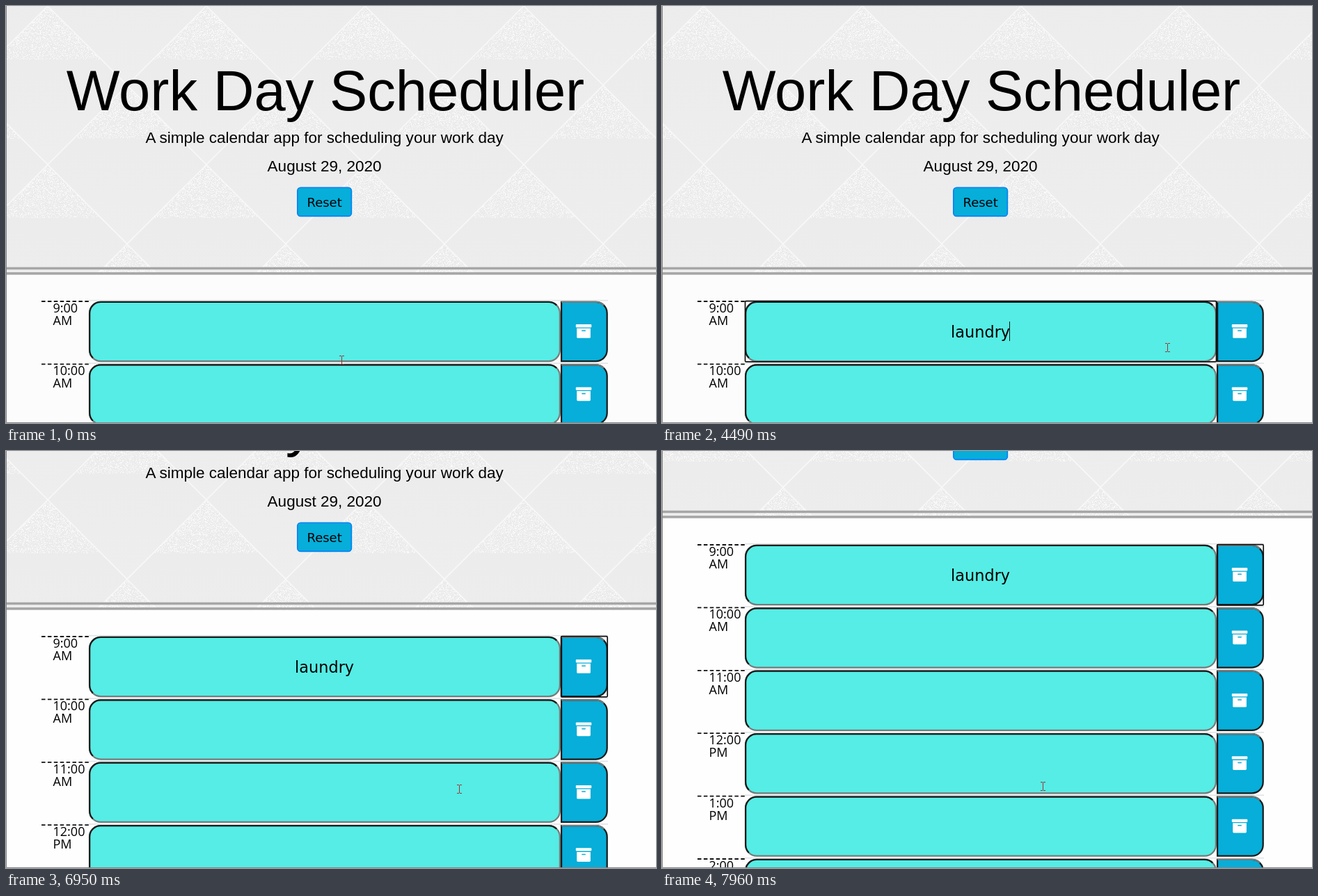
Animation of 934 by 600 pixels, one loop 8000 ms. Source, as an HTML page with a canvas:

```html
<!DOCTYPE html>
<html lang="en">
<head>
<meta charset="utf-8">
<title>Work Day Scheduler</title>
<style>
  html, body { margin: 0; width: 100%; height: 100%; overflow: hidden; background: #fcfcfc; }
  #stage { position: relative; width: 934px; height: 600px; overflow: hidden; background: #fcfcfc; }
  #page { position: absolute; left: 0; top: 0; width: 934px; height: 1000px; }
  #pattern, svg { position: absolute; left: 0; top: 0; overflow: visible; }
  .sans { font-family: "Liberation Sans", Arial, sans-serif; }
  .wide { font-family: "DejaVu Sans", Verdana, sans-serif; }
  .hour { font: 18px "Open Sans", sans-serif; }
  .band { fill: #a6a6a6; }
  .rule { fill: #dfe2e5; }
  .dash { stroke: #111; stroke-width: 1.8; stroke-dasharray: 5.5 3.4; }
  .slot, .save { fill: none; stroke-width: 2.25; }
  .slot .base { fill: #55ede5; }
  .save .base { fill: #06aed9; }
  .slot .base, .save .side { stroke: #737b7b; }
  .slot .side, .save .base { stroke: #171c1c; }
  .save.down .base { stroke: #737b7b; }
  .save.down .side { stroke: #171c1c; }
  .focus { fill: none; stroke: #111; stroke-width: 1.7; }
</style>
</head>
<body>
<div id="stage">
  <div id="page">
    <canvas id="pattern" width="934" height="387"></canvas>
    <svg id="ink" width="934" height="1000">
      <rect class="band" y="375.7" width="934" height="3.5"/>
      <rect class="band" y="383.1" width="934" height="3.5"/>
      <rect x="418.8" y="261.2" width="77.6" height="41.2" rx="4.5" fill="#06aed9" stroke="#067ffa" stroke-width="1.6"/>
      <g id="rows"></g>
      <g text-anchor="middle">
        <g class="sans">
          <text x="459" y="149.5" font-size="81.35">Work Day Scheduler</text>
          <text x="457.6" y="197" font-size="22.53">A simple calendar app for scheduling your work day</text>
          <text x="457.6" y="238" font-size="22.53">August 29, 2020</text>
        </g>
        <g class="wide">
          <text x="457.6" y="289" font-size="18">Reset</text>
          <text id="entry" x="457.6" y="477" font-size="22.4"></text>
        </g>
      </g>
      <rect id="caret" y="454" width="1" height="28" fill="#111"/>
      <rect id="slotFocus" class="focus" x="119.5" y="424.7" width="677" height="87.2" rx="1.5"/>
      <rect id="saveFocus" class="focus" x="797.6" y="424.7" width="66.6" height="87.2" rx="1.5"/>
    </svg>
  </div>
  <svg width="934" height="600">
    <path id="beam" d="M-3 -5.5H0M1 -5.5H4M-3 6.5H0M1 6.5H4M.5 -5V6" fill="none" stroke="#a5302f"/>
    <path id="hand" d="M4.5 1.5q1.5 -1.5 2.5 0v5l5.5 1.2q1.8 .6 1.6 2.3l-1.1 4v2.5H6.2v-1.8L1 9.6q.2 -2 2 -1.2l1.5 1.2z" fill="#fff" stroke="#111"/>
    <path d="M.5 0V599.5H934" fill="none" stroke="#858585"/>
  </svg>
</div>
<script>
const $ = id => document.getElementById(id);
const page = $('page'), entry = $('entry'), stage = $('stage');
const LOOP = 8000, PITCH = 90.4, TOP = 424.8;

function seeded(seed) {
  return () => (seed = (seed * 16807) % 2147483647) / 2147483647;
}

// Diamond lattice; the upper part of every diamond is speckled.
function drawPattern() {
  const c = $('pattern').getContext('2d'), rnd = seeded(77);
  const half = 114, apexes = [];
  for (let k = -2; k < 4; k++)
    for (let x = (k & 1 ? 174 : 60) - 456; x < 1200; x += 228) apexes.push([x, k * 114.2]);
  for (const [x, y] of apexes) {
    const g = c.createLinearGradient(0, y, 0, y + 228);
    g.addColorStop(0, '#ebebeb');
    g.addColorStop(0.4, '#ececec');
    g.addColorStop(1, '#eeeeee');
    c.fillStyle = g;
    c.beginPath();
    c.moveTo(x, y);
    c.lineTo(x + half, y + half);
    c.lineTo(x, y + 228);
    c.lineTo(x - half, y + half);
    c.fill();
  }
  c.fillStyle = 'rgba(255,255,255,.68)';
  for (const [x, y] of apexes) {
    for (let d = 2; d < 77; d++) {
      const density = d > 50 ? 0.24 : 0.31;
      for (let i = -d; i < d; i++)
        if (rnd() < density) c.fillRect(Math.round(x + i), Math.round(y + d), 1, 1);
    }
  }
  c.strokeStyle = '#f8f8f8';
  c.lineWidth = 1.6;
  c.beginPath();
  for (const [x, y] of apexes) {
    c.moveTo(x - half, y + half);
    c.lineTo(x, y);
    c.lineTo(x + half, y + half);
  }
  c.stroke();
}

// Bevelled boxes: a full outline plus the sides lit the other way.
const R = 16, K = R * 0.293;
const arc = (x, y) => `A${R} ${R} 0 0 1 ${x} ${y}`;

function slot(x, y, x2, y2) {
  return `<g class="slot">
    <rect class="base" x="${x}" y="${y}" width="${x2 - x}" height="${y2 - y}" rx="${R}"/>
    <path class="side" d="M${x + K} ${y2 - K}${arc(x, y2 - R)}V${y + R}${arc(x + R, y)}H${x2 - R}${arc(x2 - K, y + K)}"/>
  </g>`;
}

function save(x, y, x2, y2) {
  return `<g class="save">
    <path class="base" d="M${x} ${y}H${x2 - R}${arc(x2, y + R)}V${y2 - R}${arc(x2 - R, y2)}H${x}Z"/>
    <path class="side" d="M${x} ${y}H${x2 - R}${arc(x2 - K, y + K)}"/>
  </g>`;
}

function row(hour, i) {
  const y = TOP + i * PITCH, a = y + 1.1, b = y + 86.3;
  return `
    <rect class="rule" x="119" y="${y - 1.9}" width="746" height="1.5"/>
    <path class="dash" d="M51 ${y + 0.2}H119"/>
    ${slot(120.1, a, 795.9, b)}${save(798.1, a, 863.7, b)}
    <text class="hour" x="67.5" y="${y + 16.2}">${hour}:00</text>
    <text class="hour" x="67.5" y="${y + 34.2}">${i < 3 ? 'AM' : 'PM'}</text>
    <g transform="translate(818.8 ${y + 33.3})" fill="#fff">
      <rect width="22.5" height="4.3" rx="1"/>
      <path d="M1.4 5.6H21.1V18.3q0 1.4 -1.4 1.4H2.8q-1.4 0 -1.4 -1.4z"/>
      <rect x="8.4" y="8.4" width="5.7" height="1.5" rx=".6" fill="#06aed9"/>
    </g>`;
}

drawPattern();
$('rows').innerHTML = [9, 10, 11, 12, 1, 2].map(row).join('');
const firstSave = document.querySelector('.save');

// Each table holds [start ms, value...] steps.
const scroll = [[0, 0], [6820, 56], [6950, 158], [7100, 242], [7250, 286], [7400, 290]];
const typed = [[0, 0], [1730, 1], [1880, 2], [2030, 3], [2310, 4], [2590, 5], [2740, 6], [3020, 7]];
const caret = [[0, 0], [850, 1], [1410, 0], [1730, 1], [3470, 0], [4060, 1], [4620, 0], [5070, 1], [5510, 0]];
const focus = [[0, ''], [850, 'slot'], [5510, 'save']];
const mouse = [
  [0, 482, 509], [130, 482, 505], [280, 482, 499], [420, 482, 495],
  [3910, 503, 511], [4060, 562, 526], [4200, 632, 520], [4350, 692, 502],
  [4490, 726, 491], [4620, 752, 487], [4770, 781, 484],
  [4920, 801, 475, 'hand'], [5070, 816, 474, 'hand'],
  [6090, 768, 482], [6240, 684, 485], [6390, 651, 486],
  [7840, 584, 483], [7960, 547, 482]
];

const at = (table, t) => table.findLast(step => step[0] <= t);
const show = (el, on) => { el.style.visibility = on ? 'visible' : 'hidden'; };

function render(t) {
  const y = at(scroll, t)[1];
  page.style.transform = `translateY(${-y}px)`;
  stage.style.background = y ? '#fefefe' : '#fcfcfc';

  const text = 'laundry'.slice(0, at(typed, t)[1]);
  if (entry.textContent !== text) entry.textContent = text;
  const width = text ? entry.getComputedTextLength() : 0;
  $('caret').setAttribute('x', text ? Math.floor(456.6 + width / 2) : 458);
  show($('caret'), at(caret, t)[1]);

  const target = at(focus, t)[1];
  show($('slotFocus'), target === 'slot');
  show($('saveFocus'), target === 'save');
  firstSave.classList.toggle('down', t >= 5510 && t < 5660);

  const [, mx, my, kind] = at(mouse, t);
  for (const id of ['beam', 'hand']) {
    $(id).setAttribute('transform', `translate(${mx} ${my})`);
    show($(id), id === (kind || 'beam'));
  }
}

const start = performance.now();
function tick() {
  render((performance.now() - start) % LOOP);
  requestAnimationFrame(tick);
}
tick();
</script>
</body>
</html>
```
